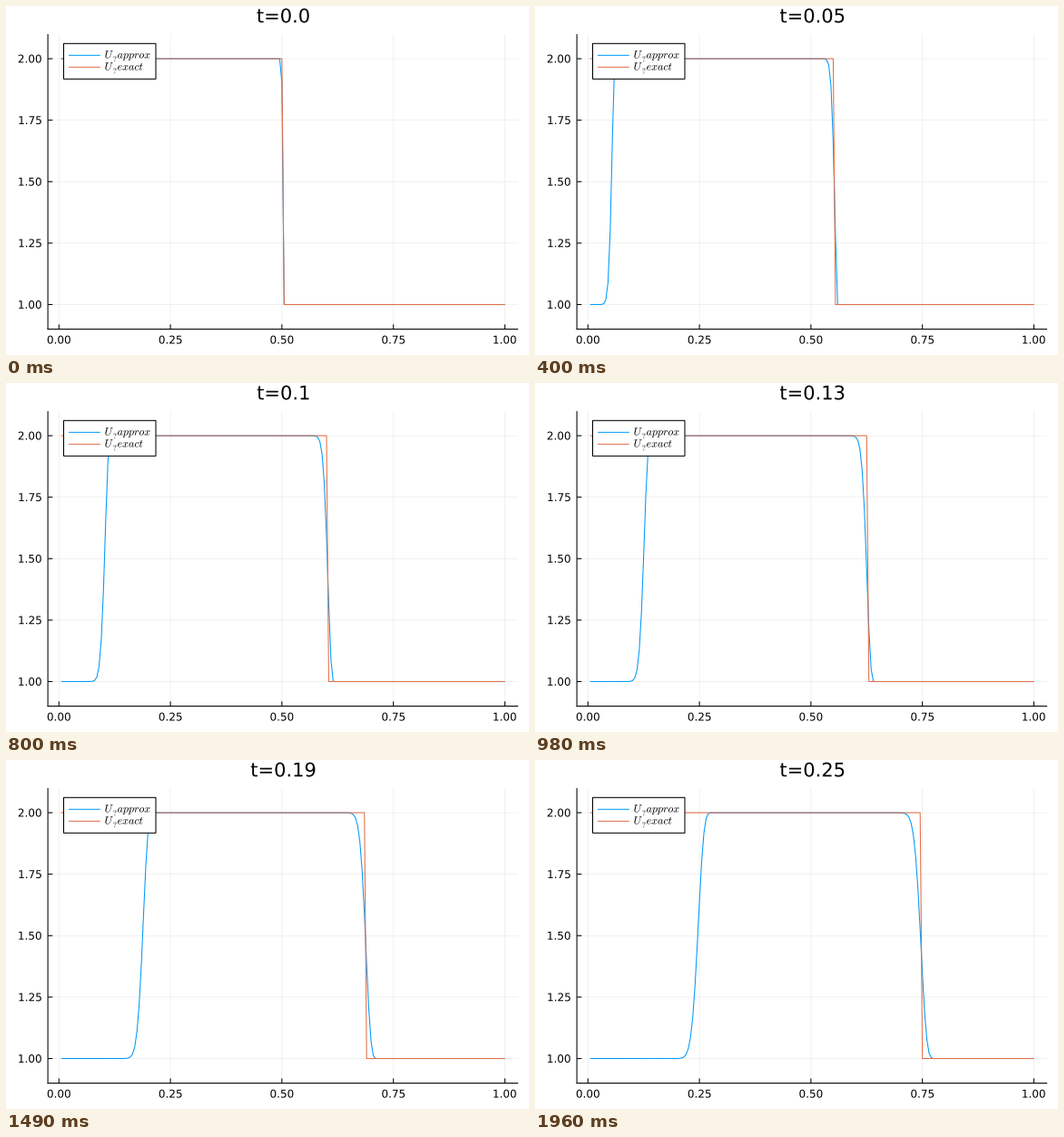
Write a matplotlib script that moves like this. It is 576 by 384 pixels and loops after 1990 ms.

```python
import numpy as np
import matplotlib.pyplot as plt
from matplotlib.animation import FuncAnimation
from matplotlib.patches import PathPatch, Rectangle
from matplotlib.textpath import TextPath
from matplotlib.transforms import Affine2D

W, H, DPI = 576, 384, 96
PX = 72 / DPI  # points per pixel
BLUE, ORANGE = "#009AFA", "#E36F47"
LEFT, RIGHT, TOP, BOTTOM = 46.1, 564.1, 30.95, 355.55

plt.rcParams["font.family"] = "DejaVu Sans"
plt.rcParams["mathtext.fontset"] = "cm"

# Upwind scheme for u_t + u_x = 0; cell 0 is a ghost fed from the right end
CELLS, STEPS, CFL = 200, 55, 0.9
x = np.arange(CELLS + 1) / CELLS
dt = CFL / CELLS


def solve():
    u = np.where(x < 0.5, 2.0, 1.0)
    states = []
    for _ in range(STEPS):
        new = u.copy()
        new[1:] -= CFL * np.diff(u)
        new[0] = u[-1]
        u = new
        states.append(u)
    return states


states = solve()

# 55 pictures over two seconds, each start rounded to 10 ms
TICK, TICKS = 10, 199
starts = np.floor(np.arange(STEPS) * 200 / STEPS + 0.5)
shown = np.searchsorted(starts, np.arange(TICKS), side="right") - 1

# One axes in pixel units, y pointing down
fig = plt.figure(figsize=(W / DPI, H / DPI), dpi=DPI, facecolor="white")
ax = fig.add_axes([0, 0, 1, 1])
ax.set_xlim(0, W)
ax.set_ylim(H, 0)
ax.axis("off")

PAD = 0.03 * (x[-1] - x[1])
X_MIN, X_MAX, Y_MIN, Y_MAX = x[1] - PAD, x[-1] + PAD, 0.9, 2.1


def px(v):
    return LEFT + (v - X_MIN) / (X_MAX - X_MIN) * (RIGHT - LEFT)


def py(v):
    return BOTTOM - (v - Y_MIN) / (Y_MAX - Y_MIN) * (BOTTOM - TOP)


def line(xs, ys, color="black", width=1.05, z=2, **style):
    return ax.plot(xs, ys, color=color, lw=width * PX, snap=False, zorder=z,
                   solid_capstyle="butt", **style)[0]


def outline(cx, base, text, size, anchor):
    """Glyph path whose ink (or origin, if anchor is None) is placed at cx."""
    path = TextPath((0, 0), text, size=size)
    if anchor is not None:
        box = path.get_extents()
        cx -= box.x0 + anchor * box.width
    return Affine2D().scale(1, -1).translate(cx, base).transform_path(path)


def label(cx, base, text, size, anchor=0.5):
    patch = PathPatch(outline(cx, base, text, size, anchor),
                      facecolor="black", linewidth=0, zorder=6)
    return ax.add_patch(patch)


# Grid, ticks and axis lines
for v in np.linspace(0, 1, 5):
    gx, gy = px(v), py(1 + v)
    line([gx, gx], [TOP, BOTTOM], width=0.55, z=1, alpha=0.1)
    line([LEFT, RIGHT], [gy, gy], width=0.55, z=1, alpha=0.1)
    line([gx, gx], [BOTTOM, BOTTOM - 5.2])
    line([LEFT, LEFT + 5.2], [gy, gy])
    label(gx, 371.5, f"{v:.2f}", 12)
    label(38.8, gy + 4.37, f"{1 + v:.2f}", 12, 1)
line([LEFT, LEFT], [TOP, BOTTOM + 0.5])
line([LEFT - 0.5, RIGHT], [BOTTOM, BOTTOM])

# Legend: two rows spaced by a third of the box
BOX_X, BOX_Y, ROW = 63.5, 41.3, 13
ax.add_patch(Rectangle((BOX_X, BOX_Y), 101.5, 3 * ROW, facecolor="white",
                       edgecolor="black", linewidth=1.05 * PX, snap=False,
                       zorder=5))
for row, color, name in ((1, BLUE, "approx"), (2, ORANGE, "exact")):
    y = BOX_Y + row * ROW
    line([69, 103.8], [y, y], color, z=6)
    label(108.6, y + 3.2, "$U$", 12, None)
    label(118, y + 7, "$?$", 8.4, None)
    label(122.6, y + 3.2, f"${name}$", 12, None)

approx = line([], [], BLUE, z=3)
exact = line([], [], ORANGE, z=4)
TITLE = ((LEFT + RIGHT) / 2, 18.2)
title = label(*TITLE, "t=0.0", 21)


def update(i):
    k = shown[i]
    t = (k + 1) * dt
    cells = x[1:]
    approx.set_data(px(cells), py(states[k][1:]))
    exact.set_data(px(cells), py(np.where(cells - t < 0.5 - 1e-9, 2.0, 1.0)))
    title.set_path(outline(*TITLE, f"t={float(np.round(t, 2))}", 21, 0.5))
    return approx, exact, title


anim = FuncAnimation(fig, update, frames=TICKS, interval=TICK,
                     repeat=True, repeat_delay=0)
plt.show()
```
